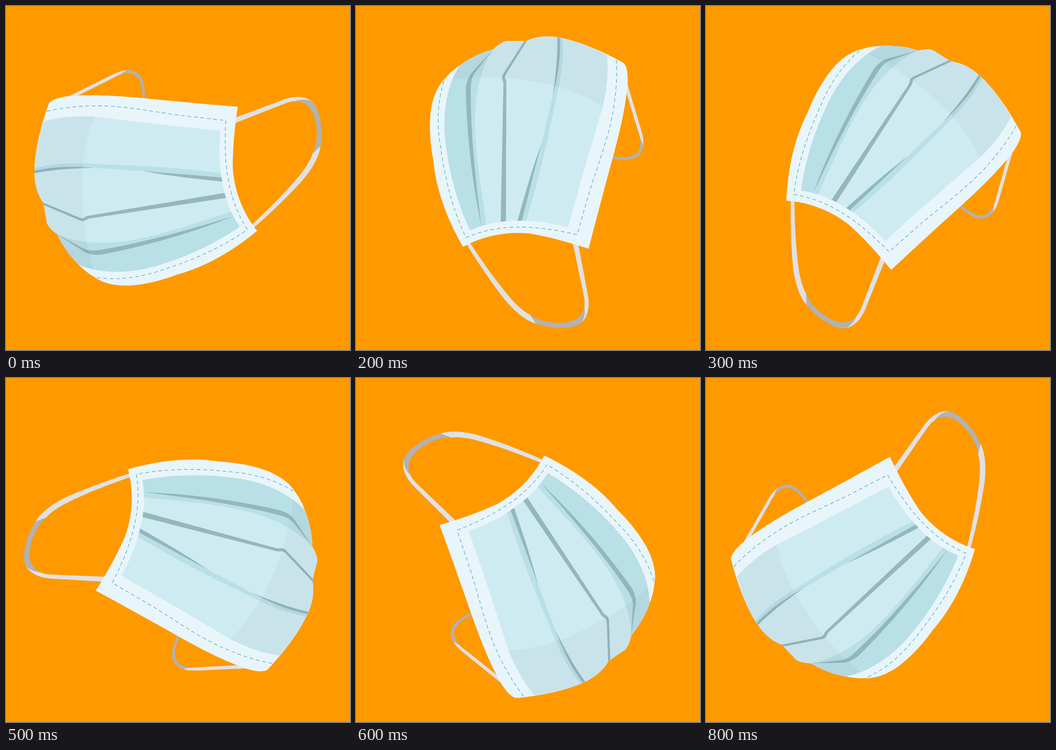
An HTML page that plays this animation: 748 px wide and 748 px high, repeating every 900 ms.

```html
<!DOCTYPE html>
<html lang="en">
<head>
<meta charset="utf-8">
<title>Spinning mask</title>
<style>
  html, body { margin: 0; width: 100%; height: 100%; overflow: hidden; background: #f90; }
  svg { display: block; width: 100%; height: 100%; }
  .band { fill: #e1e1e3; }
  .fold { fill: #b2b2b2; }
  .cloth { fill: #e8f5fa; }
  .panel { fill: #ceebf1; }
  .pleat { fill: #b9dfe7; }
  .line { fill: #93b7bd; }
  .shade { fill: #401828; opacity: .037; }
  .seam { fill: none; stroke: #58abb8; stroke-width: 1.3; stroke-dasharray: 8 6; }
</style>
</head>
<body>
<svg viewBox="0 0 748 748">
  <defs>
    <path id="panel" d="M82 251C115 241 155 238 195 241C280 251 370 262 466 271C462 315 464 345 469 375C475 418 490 453 508 480C450 520 385 549 320 567C270 581 205 584 158 562C140 545 122 520 112 497C103 490 93 482 89 472C86 456 85 445 81 428C69 410 62 390 62 360C62 325 72 283 82 251Z"/>
    <clipPath id="inside"><use href="#panel"/></clipPath>
  </defs>
  <rect width="748" height="748" fill="#f90"/>
  <g id="mask">
    <!-- ear loops -->
    <path class="band" d="M133 198L232 149C247 142 256 139 270 140L251 148C243 151 237 154 230 158L152 197Z"/>
    <path class="fold" d="M249 148L260 141Q263 140 266 140C288 139 304 156 302 204H297C298 165 285 147 268 146.5Q258 146 249 148Z"/>
    <path class="band" d="M495 244L600 205C625 195 648 195 665 207L630 207C620 207 612 210 604 213L495 256Z"/>
    <path class="band" d="M684 303C682 327 664 357 643 381C614 413 574 452 539 482L533 477C570 443 611 402 642 364C655 347 663 333 667 320Z"/>
    <path class="fold" d="M629 207C643 202 656 203 665 207C681 222 686 254 686 277Q686 293 683.5 305L667 321C680 292 676 265 672 246C666 225 655 207 629 207Z"/>

    <path class="cloth" d="M93 212C98 204 114 199 134 196C200 190 275 198 345 205C400 210 452 215 504 219C497 265 493 310 493 352C497 405 516 451 546 489C500 527 440 566 372 584C330 600 290 608 258 608C225 607 205 599 190 588C178 581 168 573 158 562C140 545 122 520 112 497C103 490 93 482 89 472C86 456 85 445 81 428C69 410 62 390 62 360C62 315 76 260 93 212Z"/>
    <use href="#panel" class="panel"/>

    <g clip-path="url(#inside)">
      <path class="pleat" d="M108 495C140 510 170 515 215 515C300 514 400 475 500 444L530 490L330 600L150 580Z"/>
      <path class="line" d="M112 497L170 528Q180 533 200 531C300 515 400 486 495 457C400 495 300 523 205 541Q183 543 168 533Z"/>
      <path class="line" d="M80 427L159 460Q166 463 170 460Q173 457 180 456L478 406L481 417L182 462Q177 463 175 465Q168 470 158 465L80 432Z"/>
      <path class="pleat" d="M60 354C90 343 140 340 200 344C300 347 380 352 470 364V375L298 359L190 352C140 349 100 351 60 361Z"/>
      <path class="line" d="M60 359C100 349 140 348 192 352C140 353 100 356 60 364Z"/>
      <path class="line" d="M298 359L472 373V382C415 376 350 369 298 359Z"/>
      <path class="shade" d="M195 238C177 280 168 325 166 370C164 440 168 500 194 585H40V238Z"/>
    </g>

    <path class="seam" d="M89 229C130 219 170 217 205 217C265 218 320 230 380 238L478 249C475 300 477 340 482 370C490 420 505 455 525 486C470 525 405 553 345 572C290 592 240 597 193 590"/>
  </g>
</svg>
<script>
  const STEP = 100;
  const ANGLES = [0, 67.2, 99.7, 132.3, 168, 203.8, 245.2, 285.7, 326.2];
  const DRIFT = { x: 0.5, y: -0.2 };
  const mask = document.getElementById('mask');
  const start = performance.now();

  // The mask turns in hard steps while its centre creeps sideways.
  function draw(ms) {
    const i = Math.floor(Math.max(0, ms) / STEP) % ANGLES.length;
    const x = 374 + i * DRIFT.x;
    const y = 374 + i * DRIFT.y;
    mask.setAttribute('transform', `translate(${x} ${y}) rotate(${ANGLES[i]}) translate(-374 -374)`);
  }

  function tick() {
    draw(performance.now() - start);
    requestAnimationFrame(tick);
  }
  tick();
</script>
</body>
</html>
```
